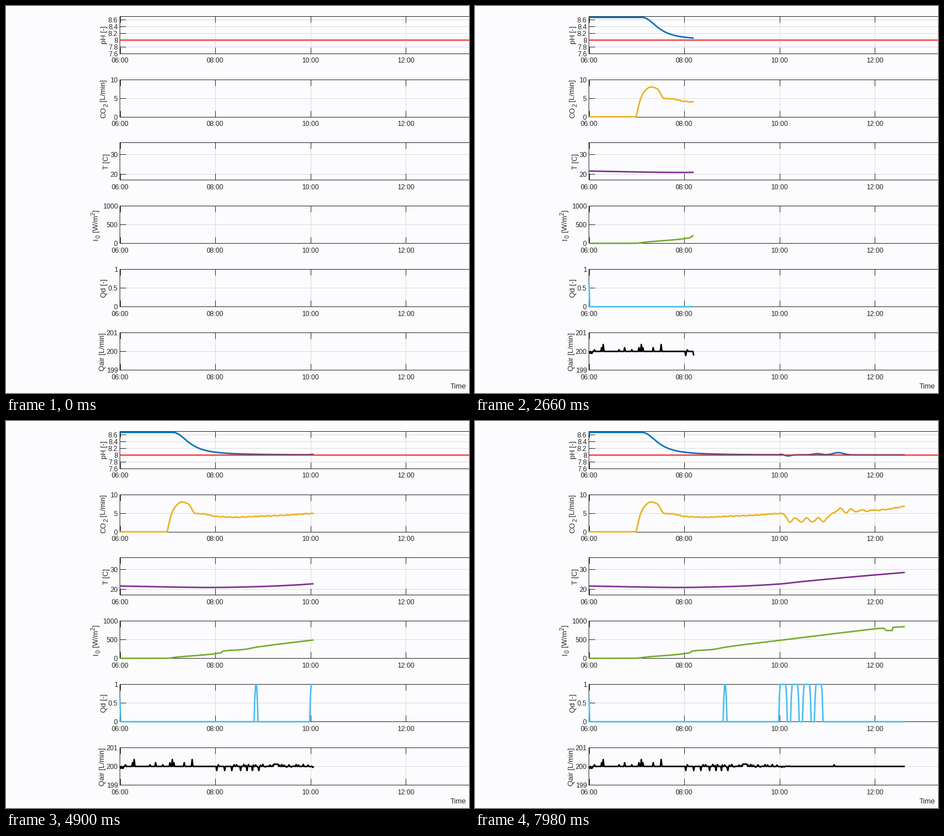
Recreate the animation shown at these times as a matplotlib script. Size 819 px wide and 684 px high, loop 8 s.

```python
import numpy as np
import matplotlib.pyplot as plt
from matplotlib.animation import FuncAnimation

W, H, DPI = 819, 684, 72          # at 72 dpi one point is one pixel
FRAMES, STEP = 400, 20
LEFT, START, MINUTE = 201.5, 202.0, 168.5 / 120
HEIGHT, TICK = 66, 11
BACK, INK, GRID = "#fcfcfe", "#262626", "#dcdce0"

plt.rcParams["font.family"] = "Liberation Sans"
rng = np.random.default_rng(4)
t = np.arange(FRAMES)             # one sample per minute and per frame


def smooth(*points):
    """Monotone cubic curve through (minute, value) points."""
    x, v = np.array(points, float).T
    h = np.diff(x)
    d = np.diff(v) / h
    m = np.zeros(len(x))
    same = d[:-1] * d[1:] > 0
    m[1:-1][same] = 2 * d[:-1][same] * d[1:][same] / (d[:-1] + d[1:])[same]
    m[0], m[-1] = d[0], d[-1]
    i = np.clip(np.searchsorted(x, t, "right") - 1, 0, len(h) - 1)
    s = (t - x[i]) / h[i]
    return (v[i] * (1 + 2 * s) * (1 - s) ** 2 + m[i] * h[i] * s * (1 - s) ** 2
            + v[i + 1] * s * s * (3 - 2 * s) + m[i + 1] * h[i] * s * s * (s - 1))


def bump(centre, height, width):
    return height * np.exp(-((t - centre) / width) ** 2)


def ph():
    drop = 0.665 / (1 + (np.maximum(t - 66, 0) / 23) ** 2.3)
    return (8.008 + drop + bump(243, 0.015, 3) + bump(251, -0.035, 5)
            + bump(288, 0.035, 7) + bump(314, 0.065, 9))


def co2():
    base = smooth((0, .1), (59, .1), (62, 2.5), (65, 4.9), (70, 6.9), (78, 8.1),
                  (86, 7.6), (95, 5), (103, 4.95), (122, 4.2), (145, 4),
                  (174, 4.25), (209, 4.55), (244, 5), (252, 3.3), (279, 3.25),
                  (296, 3.4), (306, 4.9), (314, 5.75), (345, 5.75), (370, 6),
                  (399, 7))
    swing = -0.55 * np.cos(2 * np.pi * (t - 253) / 14.3)
    fade = (0.8 * np.cos(2 * np.pi * (t - 317) / 13.5)
            * np.exp(-np.abs(t - 317) / 22))
    ripple = 0.07 * np.sin(2 * np.pi * t / 8)
    return (base + swing * ((t > 249) & (t < 300)) + fade * (t > 313)
            + ripple * (t > 100))


def temperature():
    return smooth((0, 21.55), (62, 21.05), (115, 20.83), (174, 21.25),
                  (239, 22.55), (268, 23.8), (336, 26.35), (399, 28.5))


def light():
    return smooth((0, 0), (58, 1), (70, 30), (127, 148), (130, 194), (157, 240),
                  (170, 293), (244, 492), (310, 664), (352, 770), (371, 806),
                  (375, 745), (382, 745), (383, 826), (399, 850))


def dilution():
    def pulse(start, end):
        return np.clip(np.minimum(t - start, end - t) / 1.5, 0, 1)

    pulses = [pulse(-2, 1), pulse(169, 174)]
    pulses += [pulse(a, a + 11) for a in range(239, 285, 15)]
    return np.max(pulses, axis=0)


def air():
    busy = (t > 141) & (t < 255)
    v = 200 + busy * (t % 3 == 0) * rng.uniform(-0.06, 0.12, FRAMES)
    for size, times in [(.37, (18, 66, 91)), (.2, (16, 45, 63, 68, 81)),
                        (.09, (7, 38, 54, 124, 309)), (-.1, (1, 3, 4)),
                        (-.22, (122, 132, 141, 152, 160, 167, 175))]:
        v[list(times)] = 200 + size
    v[194:200] = 200.12
    return v


# top edge, range, ticks, colour, samples
PANELS = [
    (18.5, 7.6, 8.7, (7.6, 7.8, 8, 8.2, 8.4, 8.6), "#0072bd", ph()),
    (130.5, 0, 10, (0, 5, 10), "#edb120", co2()),
    (241.5, 17, 36, (20, 30), "#7e2f8e", temperature()),
    (353.5, 0, 1000, (0, 500, 1000), "#77ac30", light()),
    (465.5, 0, 1, (0, 0.5, 1), "#4dbeee", dilution()),
    (577.5, 199, 201, (199, 200, 201), "#000000", air()),
]

fig = plt.figure(figsize=(W / DPI, H / DPI), dpi=DPI, facecolor=BACK)
ax = fig.add_axes([0, 0, 1, 1])
ax.set_xlim(0, W)
ax.set_ylim(H, 0)
ax.axis("off")


def pixel(v):
    return np.floor(v) + 0.5


def rule(x, y, color=INK, z=2, lw=1):
    # snapping would push half-pixel positions to the next pixel
    ax.plot(x, y, color=color, lw=lw, zorder=z, snap=False,
            solid_capstyle="butt", solid_joinstyle="miter")


def upright(x, y, s, size=13, ha="left"):
    ax.text(x, y, s, size=size, color=INK, rotation=90, ha=ha, va="baseline",
            rotation_mode="anchor")


def draw_panel(top, low, high, ticks, color, values):
    bottom = top + HEIGHT

    def to_y(v):
        return bottom - (v - low) / (high - low) * HEIGHT

    for k in range(4):
        mark = START + k * 120 * MINUTE
        x = pixel(mark)
        if k:
            rule([x, x], [top, bottom], GRID, 1)
        rule([x, x], [top, top + TICK])
        rule([x, x], [bottom - TICK, bottom])
        ax.text(mark - 0.4, bottom + 16, f"{6 + 2 * k:02d}:00", size=12,
                color=INK, ha="center")
    for v in ticks:
        y = pixel(to_y(v))
        rule([LEFT, W], [y, y], GRID, 1)
        rule([LEFT, LEFT + TICK], [y, y])
        ax.text(197.7, to_y(v) + 4.5, f"{v:g}", size=12, color=INK, ha="right")
    rule([W + 5, LEFT, LEFT, W + 5], [top, top, bottom, bottom])
    line, = ax.plot([], [], color=color, lw=2.67, zorder=3, snap=False,
                    solid_capstyle="butt", solid_joinstyle="round")
    return line, to_y(values)


curves = [draw_panel(*p) for p in PANELS]
rule([LEFT, W + 5], [60.3, 60.3], "#ff1a1e", 4, 2)

upright(177.5, 51.5, "pH [-]", ha="center")
upright(176, 197.5, "CO")
upright(180.5, 178.5, "2", 10.4)
upright(176, 172.7, " [L/min]")
upright(180.5, 275, "T [C]", ha="center")
upright(162.5, 413.5, "I")
upright(167, 409.9, "0", 10.4)
upright(162.5, 404.1, " [W/m")
upright(157.5, 370.2, "2", 10.4)
upright(162.5, 364.4, "]")
upright(177.5, 499, "Qd [-]", ha="center")
upright(174, 611.3, "Qair [L/min]", ha="center")
ax.text(799.5, 676.3, "Time", size=13, color=INK, ha="center")

xs = LEFT + t * MINUTE


def update(n):
    for line, ys in curves:
        line.set_data(xs[:n], ys[:n])
    return [line for line, _ in curves]


anim = FuncAnimation(fig, update, frames=FRAMES, interval=STEP,
                     init_func=lambda: update(0), repeat=True, repeat_delay=0)
plt.show()
```
